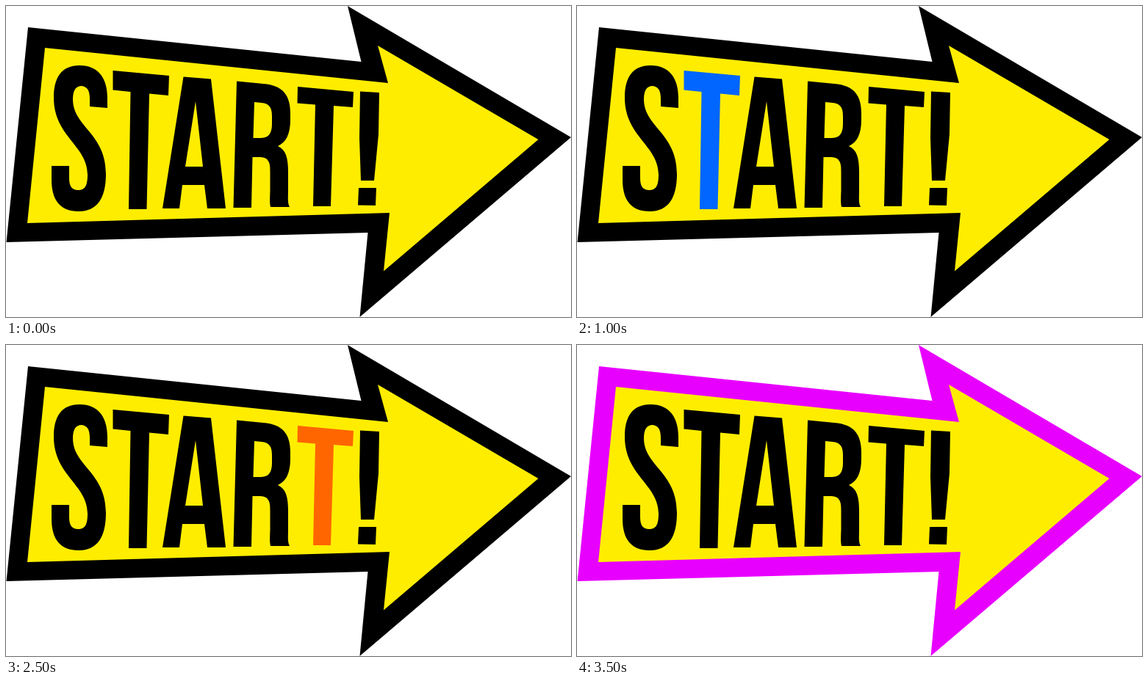
Recreate the animation shown at these times as an HTML page with a canvas. Size 769 px wide and 424 px high, loop 4 s.

```html
<!DOCTYPE html>
<html lang="en">
<head>
<meta charset="utf-8">
<title>START!</title>
<style>
html, body { margin: 0; width: 100%; height: 100%; overflow: hidden; background: #fff; }
canvas { display: block; }
</style>
</head>
<body>
<canvas width="769" height="424" role="img" aria-label="START!"></canvas>
<script>
const ctx = document.querySelector('canvas').getContext('2d');
const STEP = 500;
const LOOP = 4000;

const border = new Path2D('M30 29L483.5 76L465 0L769 179L481.5 424L492.5 309L0.5 322Z');
const face = new Path2D('M53 57L520 105L506 54L724.5 182L514 361.5L522 282L29 296Z');

// Each glyph lights up during one step; the first step is plain.
const glyphs = [
  { color: '#ff0000', d: `M138 139L114 137V127C114 114 110 110 103 109C95 109 91 115 91 127
      C91 165 136 173 136 229C136 262 124 280 99 280C74 280 62 265 62 237V218H86V235
      C86 246 90 251 98 251C107 251 111 246 111 230C111 190 65 178 65 125
      C65 97 76 81 100 81C126 81 138 99 138 125Z` },
  { color: '#0066ff', d: 'M145.5 88L222 95L221 122L195 119.5L191.5 277H167L169.5 117L145.5 114.5Z' },
  { color: '#ff00b3', d: 'M241.5 96.5L279 99.5L299 276H274L270 244H240L236 276H213ZM258 130L244 219H268Z' },
  { color: '#00ff88', d: `M314 102.5L350 106C377 108 387 122 387 146V155C387 175 381 186 370 191
      C381 196 384 207 384 226V250C384 262 383 268 386 274H360C359 269 359 264 359.5 252V226
      C360 211 356 206 344 206H335.5L334 275H309.5ZM338 131L336.5 180H345
      C357 180 362 175 362 160V150C362 138 358 133 348 132Z` },
  { color: '#ff6600', d: 'M397 110L473 117L472 138L446 136L442 273H418L421 134.5L396.5 132.5Z' },
  { color: '#12a8ff', d: 'M482 116.5L508 118L507 175L501 238H483L481 180ZM480 248H504L503 272L479 271.5Z' }
].map(({ color, d }) => ({ color, path: new Path2D(d) }));

function fill(path, color) {
  ctx.fillStyle = color;
  ctx.fill(path, 'evenodd');
}

function draw(now) {
  const step = Math.floor((now % LOOP) / STEP);
  ctx.fillStyle = '#fff';
  ctx.fillRect(0, 0, 769, 424);
  fill(border, step === 7 ? '#e800ff' : '#000');
  fill(face, '#ffed00');
  glyphs.forEach(({ path, color }, i) => fill(path, step === i + 1 ? color : '#000'));
}

const start = performance.now();
function tick() {
  draw(performance.now() - start);
  requestAnimationFrame(tick);
}
tick();
</script>
</body>
</html>
```
